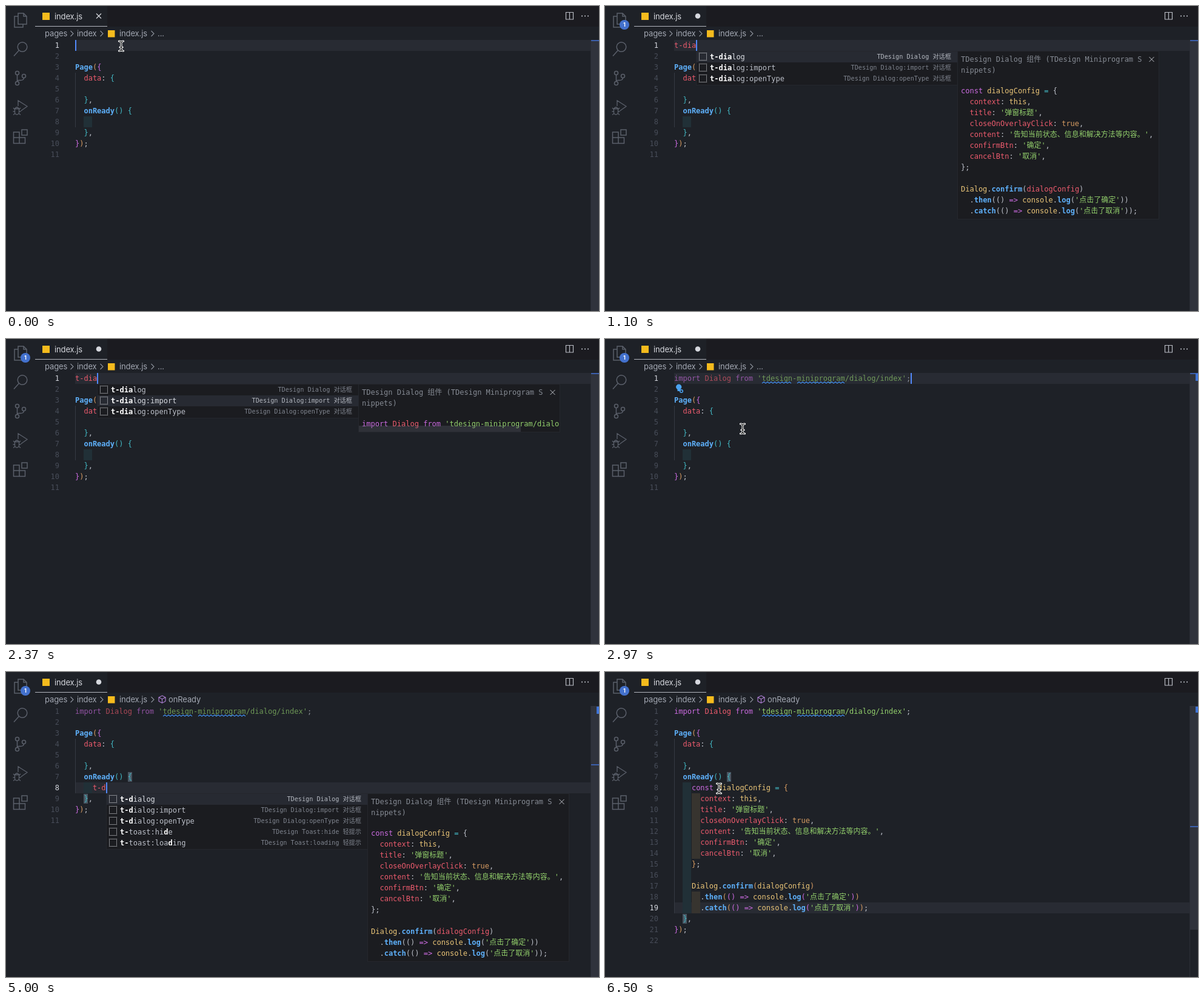
An HTML page for the animation above (6530 ms loop, 978 by 503 pixels).

```html
<!DOCTYPE html>
<html lang="en">
<head>
<meta charset="utf-8">
<title>Snippet completion</title>
<style>
  html, body { margin: 0; width: 100%; height: 100%; overflow: hidden; background: #1e2127; }
  #stage { position: relative; width: 978px; height: 503px; overflow: hidden;
    font: 12px/18px "DejaVu Sans Mono", "Noto Sans CJK SC", "Noto Sans CJK", monospace; color: #bbbfc8; }
  #stage div, svg { position: absolute; }
  .code, .row, .doc { white-space: pre; }
  .ui { font: 13px/18px Inter, Roboto, sans-serif; letter-spacing: -.12px; color: #a2a7b2; white-space: pre; }
  i { font-style: normal; }
  .n { color: #bbbfc8 } .p { color: #cb6be0 } .r { color: #ec5b6d } .g { color: #93d06c }
  .y { color: #e9c477 } .o { color: #d79c62 } .c { color: #43bac6 } .b { color: #5eb0fa; font-weight: bold }
  .num { width: 40px; left: 48px; text-align: right; color: #474c58; }
  .num.on { color: #d4d7de; }
  .list, .doc { background: #1b1c20; box-shadow: 0 0 0 1px #25272d; overflow: hidden; }
  .list { width: 430px; }
  .doc { width: 331px; }
  .row { width: 430px; height: 18px; }
  .row.on { background: #272a32; color: #d7dae0; }
  .row b { color: #fff; }
  .box { left: 4px; top: 2px; width: 11px; height: 11px; border: 1px dotted #e4e6ea; }
  .row span { position: absolute; left: 22px; }
  .row em { position: absolute; right: 10px; font-style: normal; font-size: 10.2px; color: #7f848e; }
  .row.on em { color: #b4b8c0; }
  .head { color: #858a93; left: 5px; top: 4px; }
  .badge { left: 24px; top: 22px; width: 16px; text-align: center; color: #fff; font: bold 9px/18px Inter, sans-serif; }
</style>
</head>
<body>
<div id="stage">
  <svg width="978" height="503" fill="none" stroke="#5b606b" stroke-width="1.5">
    <path d="M48 0H978V34H48Z" fill="#1b1b20" stroke="none"/>
    <path d="M48 0H167V33H48Z" fill="#1e2127" stroke="none"/>
    <path d="M48 33.5H167" stroke="#b3b6be" stroke-width="1"/>
    <path d="M60 11h12v12H60zM168 40h11.5v11.5h-11.5z" fill="#f5bb1d" stroke="none"/>
    <path d="M106.500 41l4.500 4.500-4.500 4.500M155.500 41l4.500 4.500-4.500 4.500M239.500 41l4.500 4.500-4.500 4.500" stroke="#8c919b" stroke-width="1.1"/>
    <path d="M923.500 10.500h12v11.500h-12zM929.500 10.500v11.500" stroke="#b9bcc4" stroke-width="1.2"/>
    <g fill="#b9bcc4" stroke="none"><circle cx="950" cy="16.5" r="1.1"/><circle cx="955" cy="16.5" r="1.1"/><circle cx="960" cy="16.5" r="1.1"/></g>
    <path d="M20 12h9l5 5v13H20zM29 12v5h5M20 17h-6v18h14v-5"/>
    <circle cx="27" cy="67.5" r="7.8"/><path d="M21.500 73L13 82.500"/>
    <circle cx="18.5" cy="110.5" r="3"/><circle cx="18.5" cy="127.5" r="3"/><circle cx="29.5" cy="115.5" r="3"/>
    <path d="M18.500 113.500v11M29.500 118.500q-.5 4-5 4h-3q-3 0-3 2"/>
    <path d="M20 165v-9l15 9.500-10.500 7.500M14.500 169.500h7v6q-.5 3.500-3.500 3.500t-3.500-3.500zM15 169q3-4 6 0M12 168l2.500 2.500M24 168l-2.500 2.500M11.500 174h3M21.500 174h3M12 179.500l3-2.500M24 179.500l-3-2.500" stroke-width="1.3"/>
    <path d="M12.500 208h9.500v18.500h-9.500zM12.500 217H31.500v9.500H22M26 204h9v9h-9z"/>
    <path d="M964.500 56V503" stroke="#2b2e36" stroke-width="1"/>
  </svg>
  <div class="ui" style="left:80px;top:8px;color:#d6d8de">index.js</div>
  <div class="ui" style="left:64px;top:36px">pages</div>
  <div class="ui" style="left:117px;top:36px">index</div>
  <div class="ui" style="left:187px;top:36px">index.js</div>
  <div id="view"></div>
</div>
<script>
const LOOP = 6530, LINE = 18, TOP = 56, LEFT = 114, CH = 7.224;
const WORD = 't-dia';
const firstKeys = [400, 700, 800, 900, 1030], secondKeys = [4400, 4700, 4880, 5130, 5260];
const DOWN = 1500, IMPORT = 2550, HINT = 2800, CLICK = 3600, INSERT = 5700, RESOLVED = 6200;
const edits = [0, ...firstKeys, IMPORT, CLICK, ...secondKeys, INSERT];
const mousePath = [[2700, 190, 66], [2970, 227, 148], [3550, 185, 193], [6100, 185, 193], [6300, 188, 192]];

// Each segment starts with its colour class; segments are split by "|".
const paint = s => s.split('|').map(p => `<i class="${p[0]}">${p.slice(1)}</i>`).join('');
const snippet = (o, p, arg) => [
  `pconst|y dialogConfig|c =|${o} {`,
  'r  context|n: |ythis|n,',
  "r  title|n: |g'弹窗标题'|n,",
  'r  closeOnOverlayClick|n: |otrue|n,',
  "r  content|n: |g'告知当前状态、信息和解决方法等内容。'|n,",
  "r  confirmBtn|n: |g'确定'|n,",
  "r  cancelBtn|n: |g'取消'|n,",
  `${o}}|n;`,
  '',
  `yDialog|n.|bconfirm|${o}(|${arg}dialogConfig|${o})`,
  ...[['then', '确定', ''], ['catch', '取消', '|n;']].map(([f, word, end]) =>
    `n  .|b${f}|${o}(|${p}()|p =>|y console|n.|blog|${p}(|g'点击了${word}'|${p})|${o})${end}`)
];
const importLine = "pimport|r Dialog|p from|g 'tdesign-miniprogram/dialog/index'|n;";
const docs = [snippet('n', 'n', 'r'), [importLine]];
const body = snippet('o', 'p', 'y').map(s => 'n    |' + (s || 'n'));

const groups = [
  ['Dialog', '对话框', ['', ':import', ':openType']],
  ['Message', '消息通知', ['', ':error', ':import']],
  ['Toast', '轻提示', ['', ':fail', ':hide', ':import', ':loading', ':success']]
];
const items = groups.flatMap(([name, zh, kinds]) =>
  kinds.map(k => [`t-${name.toLowerCase()}${k}`, `TDesign ${name}${k} ${zh}`]));

const at = (x, y, w, h, color) =>
  `<div style="left:${x}px;top:${y}px;width:${w}px;height:${h}px;background:${color}"></div>`;
const svg = s => `<svg width="978" height="503" fill="none">${s}</svg>`;
const lineY = n => TOP + (n - 1) * LINE;

// Bold the typed letters in order; null when the label does not match.
function mark(label, typed) {
  let k = 0;
  const out = [...label].map(ch => ch === typed[k] ? (k++, `<b>${ch}</b>`) : ch).join('');
  return k === typed.length ? out : null;
}

function popup(typed, selected, x, y) {
  const rows = items.map(([label, note]) => [mark(label, typed), note]).filter(r => r[0]);
  let out = `<div class="list" style="left:${x}px;top:${y}px;height:${rows.length * LINE + 1}px">` +
    rows.map(([label, note], i) => `<div class="row${i === selected ? ' on' : ''}" style="top:${i * LINE}px">` +
      `<div class="box"></div><span>${label}</span><em>${note}</em></div>`).join('') + '</div>';
  if (typed.length < 2) return out;
  const code = docs[selected], h = selected ? 78 : 276;
  out += `<div class="doc" style="left:${x + 431}px;top:${y}px;height:${h}px">` +
    '<div class="head">TDesign Dialog 组件 (TDesign Miniprogram S\nnippets)</div>' +
    `<div style="left:5px;top:56px">${code.map(paint).join('\n')}</div>` +
    (selected ? at(0, 68, 267, 10, 'rgba(120,125,140,.22)') : '') +
    '<svg width="331" height="30" stroke="#c0c3ca"><path d="M315.500 9l8 8m0-8l-8 8"/></svg></div>';
  return out;
}

const wave = (x, w) =>
  `<path d="M${x} 73${'l3-2.2 3 2.2'.repeat(w / 6)}" stroke="#3f8ae8" stroke-width="1.2"/>`;

function mouse(t) {
  let x = 190, y = 66;
  if (t >= firstKeys[0]) {
    if (t < 2700 || (t >= secondKeys[0] && t < 6100)) return '';
    const i = mousePath.findLastIndex(p => p[0] <= t);
    const a = mousePath[i], b = mousePath[i + 1] || a;
    const u = b === a ? 0 : (t - a[0]) / (b[0] - a[0]), e = u * u * (3 - 2 * u);
    x = a[1] + (b[1] - a[1]) * e;
    y = a[2] + (b[2] - a[2]) * e;
  }
  const d = `M${x - 3.5} ${y - 8}q3.500 0 3.500 3v10q0 3-3.500 3M${x + 3.5} ${y - 8}q-3.500 0-3.500 3v10q0 3 3.500 3M${x - 2} ${y + 2}h4`;
  return `<path d="${d}" stroke="#fff" stroke-width="3.2" stroke-linecap="round"/><path d="${d}" stroke="#111" stroke-width="1.2"/>`;
}

function render(t) {
  const count = keys => keys.filter(k => k <= t).length;
  const imported = t >= IMPORT, clicked = t >= CLICK, inserted = t >= INSERT;
  const hinted = t >= HINT, dirty = t >= firstKeys[0];
  const typed = WORD.slice(0, count(clicked ? secondKeys : firstKeys));
  const current = inserted ? 19 : clicked ? 8 : 1;
  const lines = [
    imported ? importLine : 'r' + typed, '',
    'bPage|o(|p{', 'r  data|n:|c {', '', 'c  }|n,', 'b  onReady|c() {',
    ...(inserted ? body : [clicked ? 'r    ' + typed : '']),
    'c  }|n,', 'p}|o)|n;', ''
  ];
  const closing = lines.length - 2;

  let out = at(LEFT, lineY(current), 850, LINE, '#282b33');
  out += at(128.4, lineY(8), 14, (closing - 8) * LINE, '#213037');
  if (inserted) out += at(143, lineY(9), 14, 6 * LINE, '#37342f') + at(143, lineY(18), 14, 2 * LINE, '#37342f');
  out += at(LEFT, lineY(4), 1, (closing - 4) * LINE, '#363a43');
  if (clicked) {
    const pair = '#4a5662';
    out += at(LEFT + 12 * CH, lineY(7) + 1, 7, 16, pair) + at(LEFT + 2 * CH, lineY(closing) + 1, 7, 16, pair);
  }
  lines.forEach((s, i) => {
    const y = lineY(i + 1);
    const dim = !i && hinted && t < RESOLVED ? 'opacity:.67' : '';
    out += `<div class="num${i + 1 === current ? ' on' : ''}" style="top:${y}px">${i + 1}</div>` +
      `<div class="code" style="left:${LEFT}px;top:${y}px;${dim}">${paint(s)}</div>`;
  });

  // Overview ruler
  out += at(965, TOP, 13, inserted ? 369 : 447, '#30333c');
  out += at(965, inserted ? 254 : clicked ? 152 : TOP, 13, 2, '#3c60ad');
  if (hinted) out += at(974, 57, 4, inserted ? 10 : 12, '#3f74d8');

  const column = clicked ? 4 + typed.length : imported ? 54 : typed.length;
  const caret = inserted ? 433 : LEFT + column * CH;
  const lastEdit = edits.findLast(e => e <= t);
  if ((t - lastEdit) % 1000 < 500) out += at(caret, lineY(current), 2, LINE, '#5289fa');

  out += `<div class="ui" style="left:${clicked ? 268 : 250}px;top:36px">${clicked ? 'onReady' : '...'}</div>`;
  let art = dirty
    ? '<circle cx="153" cy="16.5" r="4.3" fill="#d6d8de"/><circle cx="32" cy="31" r="8" fill="#4371cd"/>'
    : '<path d="M149 12.500l8 8m0-8l-8 8" stroke="#d6d8de" stroke-width="1.2"/>';
  if (clicked) art += '<path d="M257.500 39l5.500 2.800v6.400l-5.500 3-5.500-3v-6.400zM252 41.800l5.500 2.900 5.500-2.900M257.500 44.700v6.500" stroke="#b180d7" stroke-width="1.1"/>';
  if (hinted) {
    art += wave(259, 51) + wave(317, 79);
    if (!clicked) art += '<path d="M119.500 86v-2.500q-2.500-2-2.500-4.300a4.700 4.700 0 0 1 9.400 0q0 2-2 3.800v3z" fill="#4ba3f2"/><circle cx="126" cy="86" r="2.3" fill="#1e2127" stroke="#4ba3f2" stroke-width="1.5"/>';
  }
  out += svg(art);
  if (dirty) out += '<div class="badge">1</div>';
  if (typed && !(clicked ? inserted : imported))
    out += popup(typed, !clicked && t >= DOWN ? 1 : 0, Math.ceil(caret + .5), lineY(current) + 19);
  return out + svg(mouse(t));
}

const view = document.getElementById('view');
let shown = '';
function tick() {
  const next = render(performance.now() % LOOP);
  if (next !== shown) view.innerHTML = shown = next;
  requestAnimationFrame(tick);
}
tick();
</script>
</body>
</html>
```
